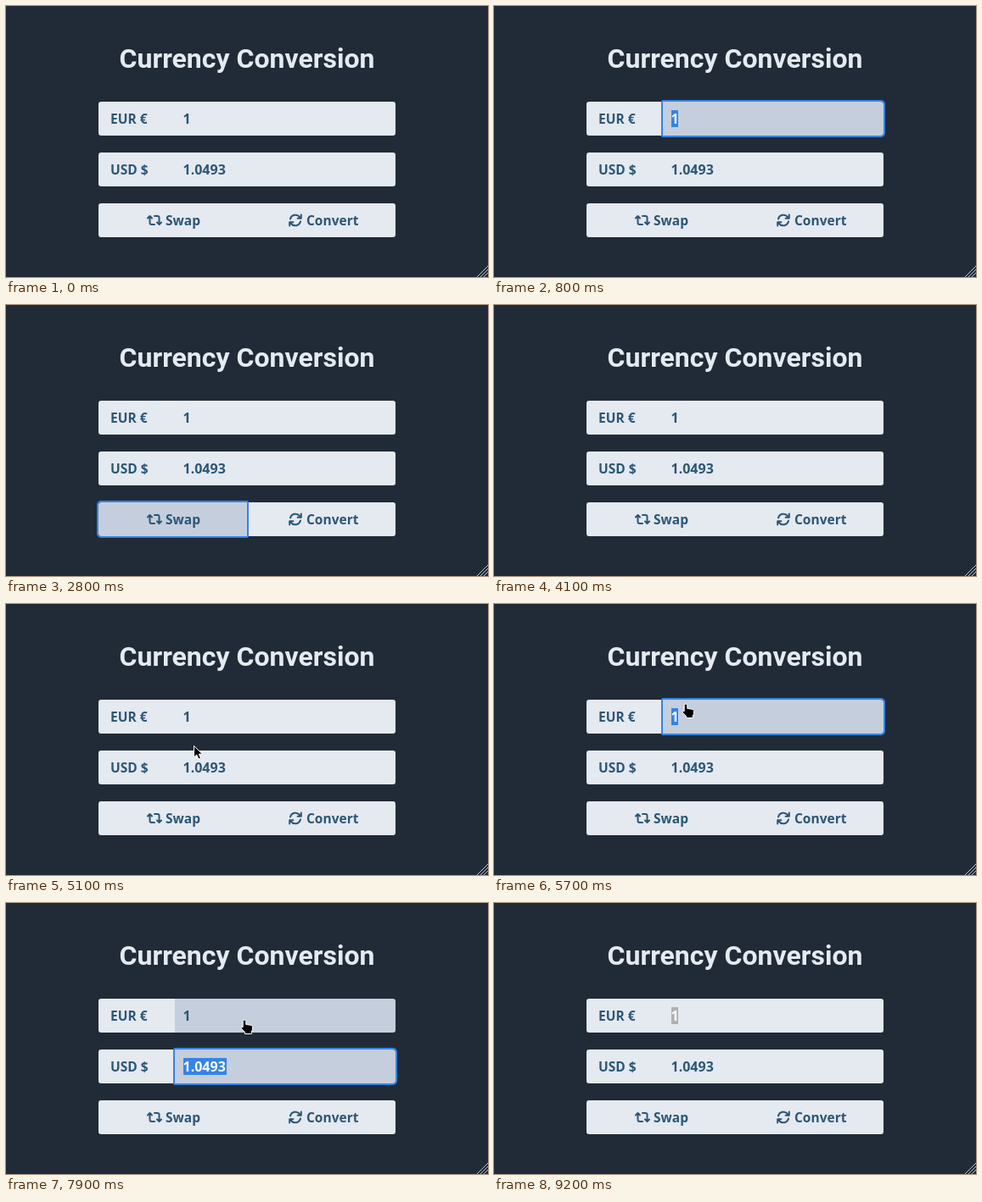
Recreate the animation shown at these times as an HTML page. Size 568 by 320 pixels, loop 9500 ms.

```html
<!DOCTYPE html>
<html lang="en">
<head>
<meta charset="utf-8">
<title>Currency Conversion</title>
<style>
html, body { margin: 0; width: 100%; height: 100%; overflow: hidden; background: #202b37; }
svg { display: block; width: 568px; height: 320px; }
h1, text { font-family: "Noto Sans", "Open Sans", sans-serif; }
text { font-size: 15.5px; font-weight: 600; fill: #2b5777; }
.title { font: 700 32px Roboto, sans-serif; fill: #e5eaf1; }
.num { font-size: 16px; }
.icon { fill: none; stroke: #2b5777; stroke-width: 2; stroke-linecap: round; stroke-linejoin: round; }
.ring { fill: none; stroke: #3584e4; stroke-width: 2; }
.cursor { fill: #000; stroke: #fff; stroke-width: 1; stroke-linejoin: round; }
</style>
</head>
<body>
<svg viewBox="0 0 568 320">
  <rect width="568" height="320" fill="#202b37"/>
  <text class="title" x="284" y="73" text-anchor="middle">Currency Conversion</text>
  <g id="boxes"></g>
  <g id="marks"></g>
  <text x="123" y="139">EUR €</text>
  <text x="123" y="199">USD $</text>
  <text class="num" id="eurNum" x="208.5" y="139">1</text>
  <text class="num" id="usdNum" x="208.5" y="199">1.0493</text>
  <text x="188" y="259">Swap</text>
  <text x="354" y="259">Convert</text>
  <g class="icon">
    <path d="M167 250.5l2.5-2.5 2.5 2.5M169.5 248.5V256q0 2 2 2H175M175 248h3.500q2 0 2 2v7.500M178 255.500l2.500 2.500 2.500-2.500"/>
    <path d="M335 251.500a6.300 6.300 0 0 1 11-2.500l1.200 1.400M347.800 246.500v4.200h-4.200M347 254.500a6.300 6.300 0 0 1-11 2.500l-1.200-1.400M334.200 259.500v-4.200h4.200"/>
  </g>
  <path d="M555 320l13-13M559 320l9-9M563 320l5-5" stroke="#c3c6ca" stroke-width="1" fill="none"/>
  <g id="rings"></g>
  <g id="pointer" class="cursor">
    <path id="hand" d="M-1.800 .600Q-1.800-1 0-1T1.800 .600V4.500L3 4.200 4.500 5 6 4.700 7.200 5.600 8.500 5.500Q9.500 6 9.500 7.500V10.500L8.300 13V15.500H.500V13.500L-3.800 9Q-4.500 7.500-3 7L-1.800 7.700Z"/>
    <path id="arrow" d="M.500 .500V14L3.700 11 6 16 8.500 15 6.300 10.200H10.500Z"/>
    <path id="beam" d="M-3-8H-1L0-7.500 1-8H3V-6H1V6H3V8H1L0 7.500-1 8H-3V6H-1V-6H-3Z"/>
  </g>
</svg>
<script>
const NS = "http://www.w3.org/2000/svg";
const $ = id => document.getElementById(id);
const LOOP = 9500, STEP = 100;
const IDLE = "#e5e9f0", HOVER = "#c5cedd", PRESS = "#b3bfd4", BLUE = "#3584e4";

function add(parent, tag, attrs) {
  const el = document.createElementNS(NS, tag);
  for (const k in attrs) el.setAttribute(k, attrs[k]);
  return $(parent).appendChild(el);
}

// l and r are the radii of the left and right corners
function boxPath(x, y, w, h, l, r) {
  const a = (rad, dx, dy) => `a${rad} ${rad} 0 0 1 ${dx} ${dy}`;
  return `M${x + l} ${y}H${x + w - r}${a(r, r, r)}V${y + h - r}${a(r, -r, r)}` +
    `H${x + l}${a(l, -l, -l)}V${y + l}${a(l, l, -l)}Z`;
}

function control(x, y, w, left) {
  const l = left ? 3 : 0, r = left ? 0 : 3;
  return {
    x, y, w,
    box: add("boxes", "path", { d: boxPath(x, y, w, 40, l, r) }),
    ring: add("rings", "path", {
      class: "ring",
      d: boxPath(x - 1, y - 1, w + 2, 42, l + 1, r + 1)
    })
  };
}

const controls = {
  eurTag: control(109, 113, 90, true),
  eur: control(199, 113, 260, false),
  usdTag: control(109, 173, 90, true),
  usd: control(199, 173, 260, false),
  swap: control(109, 233, 175, true),
  convert: control(284, 233, 175, false)
};

const fields = {
  eur: { text: $("eurNum"), mark: add("marks", "rect", { x: 209, y: 123, width: 8, height: 20 }) },
  usd: { text: $("usdNum"), mark: add("marks", "rect", { x: 209, y: 183, width: 51, height: 20 }) }
};

const focusAt = [
  [0, ""], [200, "eurTag"], [800, "eur"], [1500, "usdTag"], [2000, "usd"],
  [2800, "swap"], [3500, "convert"], [4100, ""], [5500, "eur"],
  [6800, "usd"], [8100, "eur"], [9200, ""]
];
const pressAt = { 5500: "eur", 6800: "usd", 8100: "eur" };

// start time, steps, from, to
const moves = [
  [4600, 7, [213, 281], [224, 121]],
  [5600, 1, [224, 121], [225.500, 119]],
  [5900, 8, [225.500, 119], [285, 195]],
  [7200, 7, [285, 195], [281, 139]],
  [8400, 7, [281, 139], [79, 1]]
];

function pointerAt(t) {
  if (t < 4700 || t >= 9200) return null;
  const [start, steps, from, to] = moves.filter(m => t > m[0]).pop();
  const p = Math.min(1, (t - start) / (steps * STEP));
  return from.map((v, i) => v + (to[i] - v) * p);
}

function inside(c, [x, y]) {
  return x >= c.x && x < c.x + c.w && y >= c.y && y < c.y + 40;
}

const show = (el, on) => el.setAttribute("visibility", on ? "visible" : "hidden");

function draw(time) {
  const t = Math.floor((time % LOOP) / STEP) * STEP;
  const focus = focusAt.filter(f => f[0] <= t).pop()[1];
  const pos = pointerAt(t);
  let over = false;

  for (const name in controls) {
    const c = controls[name];
    const hover = pos !== null && inside(c, pos);
    over = over || hover;
    const fill = pressAt[t] === name ? PRESS : hover || focus === name ? HOVER : IDLE;
    c.box.setAttribute("fill", fill);
    show(c.ring, focus === name);
  }

  for (const name in fields) {
    const f = fields[name];
    const faded = name === "eur" && t >= 9200;
    const marked = focus === name || faded;
    show(f.mark, marked);
    f.mark.setAttribute("fill", faded ? "#b0b0b0" : BLUE);
    f.text.style.fill = marked ? "#fff" : "";
  }

  const onTitle = pos && pos[0] > 134 && pos[0] < 434 && pos[1] > 44 && pos[1] < 81;
  show($("hand"), pos && over);
  show($("beam"), pos && !over && onTitle);
  show($("arrow"), pos && !over && !onTitle);
  if (pos) $("pointer").setAttribute("transform", `translate(${pos.map(Math.round)})`);
}

function tick() {
  draw(performance.now());
  requestAnimationFrame(tick);
}
tick();
</script>
</body>
</html>
```
